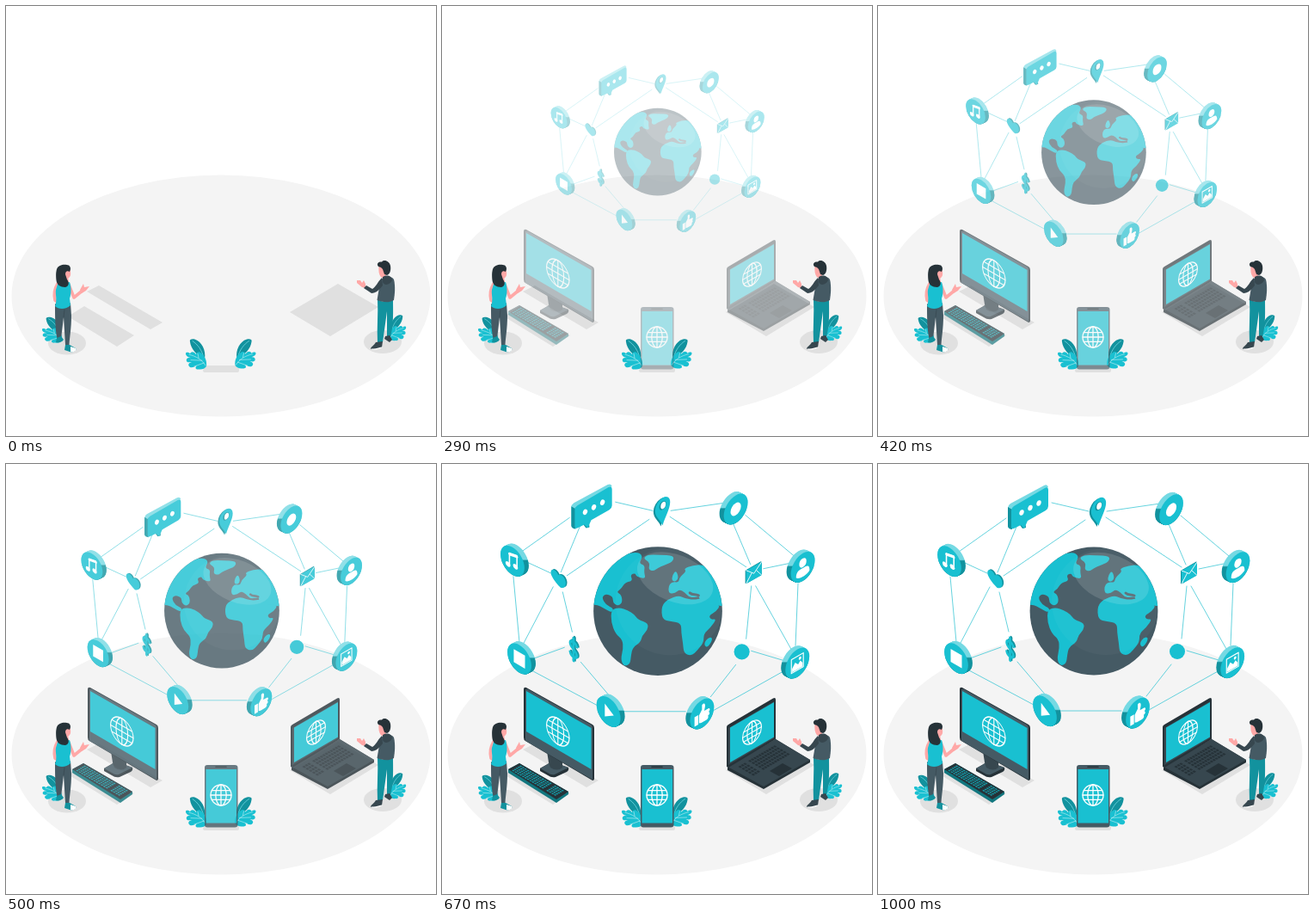
Write an HTML page with a canvas that moves like this. It is 500 by 500 pixels and loops after 1.04 s.

```html
<!DOCTYPE html>
<html lang="en">
<head>
<meta charset="utf-8">
<title>Connected world</title>
<style>
html, body { margin: 0; width: 100%; height: 100%; overflow: hidden; background: #fff; }
canvas { display: block; width: 100vw; height: 100vh; }
</style>
</head>
<body>
<canvas id="stage"></canvas>
<script>
const SIZE = 500, LOOP = 1040, STEPS = 25;
const DPR = window.devicePixelRatio || 1;
const TEAL = '#19c0d1', DEEP = '#12929e', PALE = '#75d9e3', DARK = '#263238',
      SLATE = '#37474f', GREY = '#455a64', SKIN = '#ffa8a7', SHADE = '#e0e0e0', WHITE = '#fff';

let g;

function sheet(canvas) {
  canvas.width = canvas.height = SIZE * DPR;
  const c = canvas.getContext('2d');
  c.scale(DPR, DPR);
  return c;
}
const newSheet = () => sheet(document.createElement('canvas'));

function fill(d, color) {
  g.fillStyle = color;
  g.fill(new Path2D(d));
}
function line(d, color, w) {
  g.strokeStyle = color;
  g.lineWidth = w;
  g.lineCap = g.lineJoin = 'round';
  g.stroke(new Path2D(d));
}
function oval(x, y, rx, ry, color, turn = 0) {
  g.fillStyle = color;
  g.beginPath();
  g.ellipse(x, y, rx, ry, turn, 0, 7);
  g.fill();
}
// smooth closed shape through the middles of the given points
function blob(text, color) {
  const p = text.split(' ').map(s => s.split(',').map(Number));
  const mid = i => {
    const a = p[i % p.length], b = p[(i + 1) % p.length];
    return [(a[0] + b[0]) / 2, (a[1] + b[1]) / 2];
  };
  g.fillStyle = color;
  g.beginPath();
  g.moveTo(...mid(0));
  for (let i = 1; i <= p.length; i++) g.quadraticCurveTo(...p[i % p.length], ...mid(i));
  g.fill();
}
function at(x, y, draw, a = 1, b = 0, c = 0, d = 1) {
  g.save();
  g.transform(a, b, c, d, x, y);
  draw();
  g.restore();
}
// side 1: wall falling to the right, side -1: wall rising to the right
const wall = (x, y, side, draw) => at(x, y, draw, 0.866, 0.5 * side);

/* ---------- ground, plants and people ---------- */

function plant(x, y, sx, sy) {
  at(x, y, () => {
    fill('M-2-10C0-20-6-31-13-33C-17-34-20-33-19-30C-18-22-12-14-2-10Z', DEEP);
    line('M-3-11C-5-20-10-27-16-31', PALE, 0.8);
    fill('M0-1C1-8-2-14-8-18C-11-18-12-16-12-15C-14-19-18-19-19-16C-21-18-24-18-24-16' +
         'C-24-13-21-12-18-11C-22-12-24-10-23-7C-21-5-19-6-17-6C-21-5-22-2-19 0' +
         'C-16 1-13-1-11-2C-14 1-12 3-9 2.500C-5 3-2 2 0-1Z', TEAL);
    line('M-1-2C-5-9-12-13-20-15M-5-8L-18-8.500M-3-5L-14-1M-9-11L-10-16', '#c9f0f4', 0.6);
  }, sx, 0, 0, sy);
}

function woman() {
  line('M60 323C57 328 55 334 57 342L62 346', SKIN, 3.6);
  fill('M57 346C63 351 71 351 75 345L76 360C76 375 74 385 73.5 394L69 394L67 362L64 387L59.5 387C57 375 57 360 57 346Z', GREY);
  line('M67 362L68 353', SLATE, 0.7);
  fill('M59 386L64 384L67 388C65 391 61 392 58 391Z', DEEP);
  fill('M69 394L74 394L81 398C83 401 77 403 74 402L68 400Z', DEEP);
  fill('M75 396L81 398C83 401 78 403 75 402Z', WHITE);
  line('M73 324L79 339L90 330', SKIN, 3.6);
  fill('M86 330L90 323L91 327L97 326L93 331L88 334Z', SKIN);
  fill('M66 313L72 313L73 322L66 322Z', SKIN);
  fill('M61 320C65 322 70 322 74 321C76 327 76 335 74 340L75 348C70 353 61 353 57 349C60 342 57 335 58 330Z', TEAL);
  fill('M69 306L74.5 307C76 312 75 316 71 317L68 316Z', SKIN);
  fill('M59 306C61 300 69 300 73 301.500C76 304 75 307 74 309C71 307 69 309 69 312L71 318C74 322 73 326 69 327C63 327 59 324 58.5 319C58 313 58 310 59 306Z', DARK);
}

function man() {
  fill('M432 341C438 345 446 345 450 341C450 355 451 370 447 385L443 385L443 355L438 391L432 391C431 375 433 358 432 341Z', DEEP);
  fill('M441 384L446 383L449 388L446 391L440 387Z', SLATE);
  fill('M430 391L438 390L437 397C433 398 428 400 424 399C424 396 428 395 430 391Z', SLATE);
  line('M425 399C429 400 433 398 437 397', WHITE, 1.2);
  fill('M418 328L414 327L408 322L408 319L412 319L414 322L416 319L418 323Z', SKIN);
  fill('M433.5 303L441 304L442 315L437 316C434 314 433 309 433.5 303Z', SKIN);
  fill('M437 317C441 313 449 314 451 318C453 326 452 335 451 342C445 346 436 344 431.5 342L434 327Z', GREY);
  fill('M437 316C432 321 430 327 426 329L419 325L416 328L425 334C430 334 434 330 438 325Z', SLATE);
  fill('M438 315C443 312 449 314 449 319C447 324 440 326 438 321Z', SLATE);
  fill('M433 303C430 299 434 297 437 297.5C440 294 446 297 447 302C448 308 446 312 443 313L440 312L438 306L436 304Z', DARK);
}

function ground() {
  oval(250, 337, 243.5, 140.5, '#f4f4f4');
  fill('M94 332L108 325L182 368L168 376ZM72 361L91 349L149 383L129 396Z' +
       'M386 323L433 350L377 384L330 356ZM231 418H269Q271 418 271 420V424Q271 426 269 426H231Q229 426 229 424Z', SHADE);
  oval(71, 392, 22, 13.5, SHADE);
  oval(438, 390.5, 22, 13.5, SHADE);
  plant(65, 389.5, 0.96, 0.83);
  plant(446, 387, -0.8, 0.83);
  plant(233, 420, 1, 0.98);
  plant(266.5, 419, -1, 0.95);
}

/* ---------- devices ---------- */

function webIcon(r) {
  g.strokeStyle = WHITE;
  g.lineWidth = 1.3;
  for (const k of [1, 0.52]) {
    g.beginPath();
    g.ellipse(0, 0, r * k, r, 0, 0, 7);
    g.stroke();
  }
  const h = r * 0.45, w = r * 0.88;
  line(`M0 ${-r}V${r}M${-r} 0H${r}M${-w} ${-h}H${w}M${-w} ${h}H${w}`, WHITE, 1.3);
}

function keys(cols, rows, color) {
  g.fillStyle = color;
  for (let r = 0; r < rows; r++)
    for (let c = 0; c < cols; c++)
      if (c !== Math.round(cols * 0.72))
        g.fillRect(4 + c * 92 / cols, 8 + r * 86 / rows, 66 / cols, 58 / rows);
}

function monitor() {
  fill('M114 354L128 346L147 353Q148 356 145 358L132 364Q127 365 123 362L114 357Z', DARK);
  fill('M114 354L128 346L147 353L131 361Q127 362 123 359Z', GREY);
  fill('M122 334L140 344V353Q134 358 126 353L124 347Z', SLATE);
  fill('M95 262Q95 259 98 260L175 303Q177 304 177 307V366Q177 368 175 368L97 322Q95 321 95 318Z', DARK);
  fill('M97 264Q97 261 100 262L173 303Q175 304 175 307V367L97 322Z', GREY);
  fill('M98 264L173.5 307V355L98 311Z', TEAL);
  wall(134.8, 311, 1, () => webIcon(15.2));
}

function keyboard() {
  fill('M77 355L90 348L147 381V384L133 394L77 359Z', '#12777f');
  fill('M77 355L90 348L147 381L133 390Z', DARK);
  at(90, 348.5, () => keys(18, 5, '#159aa6'), 0.56, 0.325, -0.125, 0.075);
}

function laptop() {
  fill('M332 353L388 320L428 344V347L374 378L332 356Z', DARK);
  fill('M332 352L388 320L428 344L374 375Z', SLATE);
  at(387, 325, () => keys(15, 5, DARK), -0.47, 0.275, 0.22, 0.13);
  fill('M381 357L396 348L407 354L392 363Z', DARK);
  fill('M331 306Q331 304 333 303L385 272.5Q388 271 388 274V320L333 353L331 352Z', DARK);
  fill('M333 307L386 276V319L333 350Z', SLATE);
  fill('M335 306.5L386 277V317.5L335 347Z', TEAL);
  wall(360.5, 312, -1, () => webIcon(12.6));
}

function phone() {
  fill('M234 350H266Q269.5 350 269.5 353V419.5Q269.5 422.5 266 422.5H234Q231 422.5 231 419.5V353Q231 350 234 350Z', GREY);
  g.fillStyle = TEAL;
  g.fillRect(232.5, 355, 35.5, 62.5);
  line('M244 352.3H256', DARK, 1.6);
  at(250, 385, () => webIcon(12));
}

/* ---------- globe ---------- */

function globe() {
  g.save();
  g.beginPath();
  g.arc(251, 171, 74.4, 0, 7);
  g.clip();
  g.fillStyle = GREY;
  g.fillRect(170, 90, 170, 170);
  // the Americas and Greenland
  blob('170,165 172,150 184,128 204,108 226,102 234,107 229,116 236,118 235,126 237,134 226,131 225,127 219,129 ' +
       '222,136 213,138 209,145 203,149 209,152 210,162 204,165 199,161 199,154 191,151 186,155 191,164 ' +
       '200,168 198,173 189,168 180,163', TEAL);
  blob('197,169 207,167 216,170 224,175 228,181 240,185 239,193 233,199 231,207 222,213 220,222 219,232 212,235 ' +
       '208,227 211,214 210,204 202,197 197,184', TEAL);
  blob('234,110 239,106 252,106 270,107 268,114 258,118 251,121 246,125 240,123 242,115', TEAL);
  // Europe, Asia and Africa
  blob('263,143 267,137 275,138 276,132 284,125 281,122 291,118 306,117 330,140 330,166 318,164 308,164 303,161 ' +
       '299,158 299,154 293,155 287,155 282,149 276,146 271,150 264,151', TEAL);
  blob('255,165 263,157 275,153 282,156 292,158 303,156 306,163 324,163 318,172 310,176 312,181 319,180 312,190 ' +
       '304,197 304,207 297,216 290,223 281,220 280,208 278,196 278,185 266,183 256,181', TEAL);
  blob('305,207 309,202 314,201 313,207 308,213 305,211', TEAL);
  blob('268,129 272,124 275,132 272,137 267,136', TEAL);
  line('M288 150C291 153 294 151 298 153', GREY, 3);
  oval(265, 160, 63, 62, 'rgba(255,255,255,.03)');
  oval(271, 133, 46, 27, 'rgba(255,255,255,.13)', 0.38);
  g.restore();
}

/* ---------- network ---------- */

const LINKS =
  'M202 45L245 55M266 55L328 46M352 60L408 107M413 139L410 211M397 240L315 286M283 287L212 287' +
  'M181 280L106 240M91 207L84 131M94 102L149 63M161 73L139 126M127 127L101 115M130 143L96 208' +
  'M141 149L152 195M143 213L107 226M162 230L196 270M146 130L241 65M265 62L353 120M338 70L358 117' +
  'M373 122L402 116M359 142L353 203M364 142L405 215M359 217L396 228M341 233L312 270';

function disc(x, y, side, icon) {
  const rim = g.createLinearGradient(x, y - 18, x, y + 18);
  rim.addColorStop(0, PALE);
  rim.addColorStop(0.48, PALE);
  rim.addColorStop(0.52, DEEP);
  rim.addColorStop(1, DEEP);
  const face = () => { g.beginPath(); g.arc(0, 0, 16, 0, 7); };
  g.fillStyle = rim;
  for (let k = -5; k <= 5; k++) {
    wall(x + side * k / 2, y - k / 4, side, face);
    g.fill();
  }
  wall(x - side * 2.5, y + 1.2, side, () => {
    face();
    g.fillStyle = TEAL;
    g.fill();
    icon();
  });
}

const music = () => {
  line('M-4 6V-7L6-9V4', WHITE, 1.8);
  line('M-4-6L6-8', WHITE, 3);
  oval(-6, 6.5, 3.3, 2.8, WHITE);
  oval(4, 4.5, 3.3, 2.8, WHITE);
};
const square = () => { g.fillStyle = WHITE; g.fillRect(-7.5, -7.5, 15, 15); };
const dot = () => oval(0, 0, 7, 7, WHITE);
const play = () => fill('M-5-7L7 1L-5 8Z', WHITE);
const person = () => {
  oval(0, -5, 4.8, 5, WHITE);
  fill('M-9 8C-9 0-4 1 0 1C4 1 9 0 9 8C5 12-5 12-9 8Z', WHITE);
};
const picture = () => {
  line('M-8-8H8V8H-8Z', WHITE, 1.3);
  fill('M-7 7V3L-3-2L1 2L4-1L7 3V7Z', WHITE);
  oval(3.5, -4, 1.7, 1.7, WHITE);
};
const thumb = () => {
  fill('M-10-1H-5V10H-10ZM-4 0L0-5V-10C2-12 5-10 4-6L3-2H9C11-1 11 1 9 2C11 4 10 6 8 6C9 8 8 10 6 10H-1L-4 9Z', WHITE);
};

function bubble() {
  fill('M151 51Q151 48 154 46L193 25Q197 23 198 27L158 52L156 76Q151 76 151 72Z', PALE);
  fill('M151 50L156 53V76Q151 75 151 72Z', DEEP);
  fill('M165 71L168 75L172 74L171 66Z', DEEP);
  fill('M155 54Q155 51 158 49L194 28Q198 26 198 30V49Q198 52 195 54L174 66L170 75L166 71L158 75Q155 76 155 73Z', TEAL);
  for (let i = 0; i < 3; i++) oval(167 + i * 10, 56.5 - i * 5.5, 2.5, 3.4, WHITE, 0.4);
}

function pin() {
  const d = 'M-10 0A10 10 0 1 1 10 0C10 8 3 14 0 22C-3 14-10 8-10 0Z';
  wall(254.5, 51, -1, () => fill(d, DEEP));
  wall(256.5, 50, -1, () => {
    fill(d, TEAL);
    oval(0, -1, 4.6, 4.8, DEEP);
    oval(0.8, -0.8, 3.4, 4, WHITE);
  });
}

function smallIcons() {
  const heart = 'M3 8C-5 5-11 0-10-4C-9-9-3-10 0-5C4-9 10-6 10-1C10 4 7 7 3 8Z';
  wall(137.5, 133.7, 1, () => fill(heart, DEEP));
  wall(136, 134.4, 1, () => fill(heart, TEAL));

  const dollar = 'M4.500-5C3-10-4.500-10-4.500-5C-4.500 0 4.500 0 4.500 5C4.500 10-3.500 10-4.500 5M0-13V13';
  wall(155, 214.5, 1, () => line(dollar, DEEP, 3.2));
  wall(153.5, 215.3, 1, () => line(dollar, TEAL, 3.2));

  fill('M352 124L370 113.5L371 114V129L353 139.5L352 139Z', DEEP);
  fill('M353 124L371 114V129.5L353 139.5Z', TEAL);
  line('M353 124L362 127.5L371 114M353 139.5L359.5 127M371 129.5L365 124', WHITE, 0.9);

  oval(348, 218, 9, 9, TEAL);
}

function network() {
  line(LINKS, '#3fc8d6', 0.8);
  globe();
  bubble();
  pin();
  disc(85.5, 112, 1, music);
  disc(93.5, 225, 1, square);
  disc(196.5, 286, 1, play);
  disc(338.5, 52, -1, dot);
  disc(416, 119, -1, person);
  disc(409.7, 230, -1, picture);
  disc(299.5, 288.5, -1, thumb);
  smallIcons();
}

/* ---------- motion ---------- */

// cubic-bezier(.36, -.01, .5, 1.38)
function ease(x) {
  if (x >= 1) return 1;
  const curve = (s, a, b) => 3 * (1 - s) ** 2 * s * a + 3 * (1 - s) * s * s * b + s ** 3;
  let lo = 0, hi = 1;
  for (let i = 0; i < 24; i++) {
    const s = (lo + hi) / 2;
    if (curve(s, 0.36, 0.5) < x) lo = s; else hi = s;
  }
  return curve(lo, -0.01, 1.38);
}

const stage = sheet(document.getElementById('stage'));
const back = newSheet(), gear = newSheet(), crowd = newSheet(), web = newSheet();
const paint = (target, ...parts) => { g = target; parts.forEach(draw => draw()); };
paint(back, ground);
paint(gear, monitor, keyboard, laptop, phone);
paint(crowd, woman, man);

function put(layer, alpha) {
  stage.globalAlpha = alpha;
  stage.drawImage(layer.canvas, 0, 0, SIZE, SIZE);
}

function render(ms) {
  const step = Math.min(STEPS - 1, Math.floor((ms % LOOP + 2.5) / (LOOP / STEPS)));
  const e = step ? ease(0.03 + step * 0.0416) : 0;
  const alpha = Math.max(0, Math.min(1, e)), zoom = 0.5 + 0.5 * e;

  web.clearRect(0, 0, SIZE, SIZE);
  g = web;
  at(250.5 * (1 - zoom), 166.5 * (1 - zoom), network, zoom, 0, 0, zoom);

  stage.globalAlpha = 1;
  stage.fillStyle = WHITE;
  stage.fillRect(0, 0, SIZE, SIZE);
  put(back, 1);
  put(web, alpha);
  put(gear, alpha);
  put(crowd, 1);
}

const start = performance.now();
function tick() {
  render(performance.now() - start);
  requestAnimationFrame(tick);
}
tick();
</script>
</body>
</html>
```
